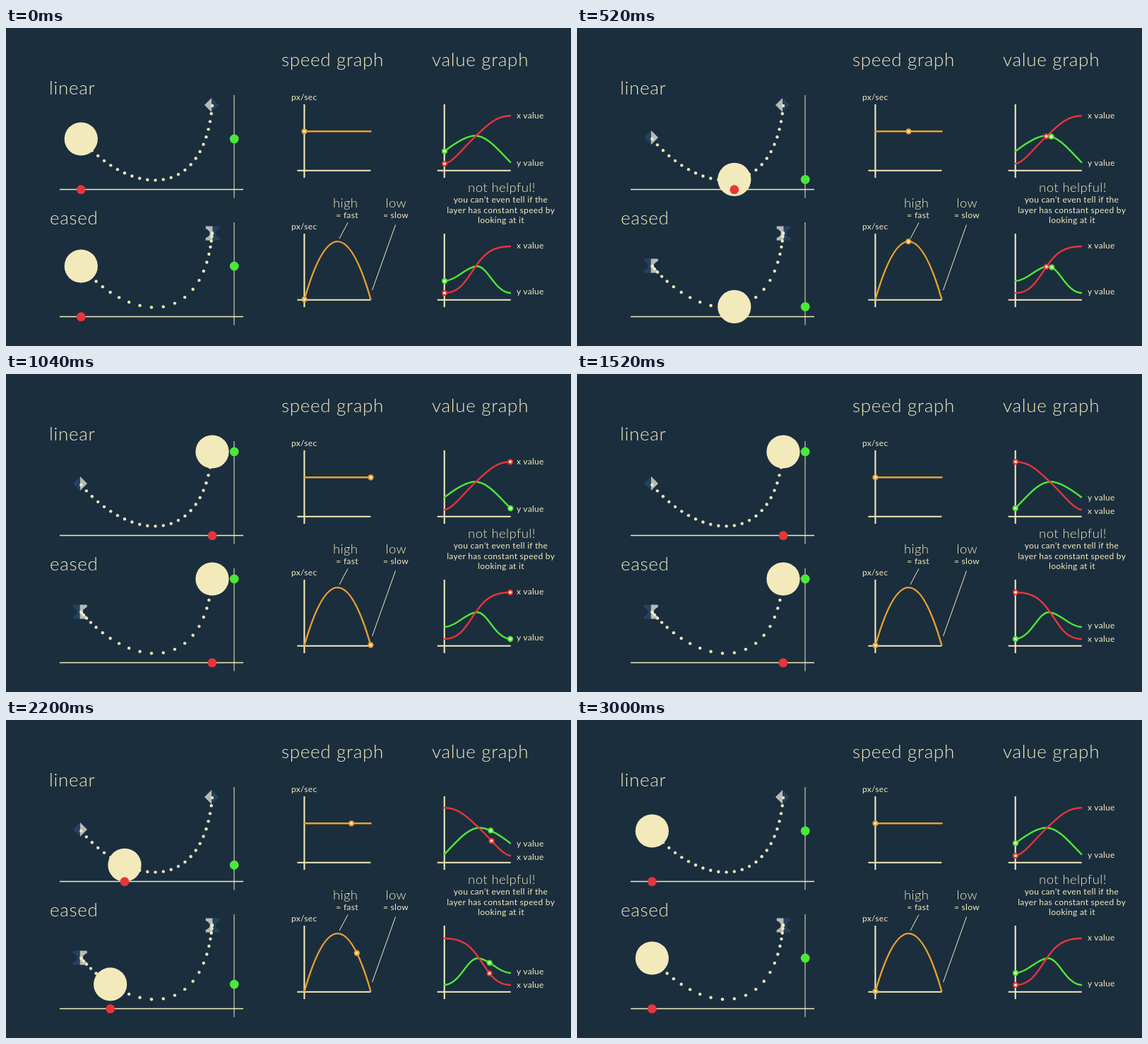
Recreate the animation shown at these times as an HTML page. Size 800 by 450 pixels, loop 3.04 s.

```html
<!DOCTYPE html>
<html lang="en">
<head>
<meta charset="utf-8">
<title>Speed graph and value graph</title>
<style>
  html, body { margin: 0; width: 100%; height: 100%; overflow: hidden; background: #1b2e3e; }
  svg { display: block; width: 100vw; height: 100vh; }
  text { font: 12px Lato, "Open Sans", sans-serif; fill: #f3eabb; letter-spacing: .3px; }
  .title { font-size: 26px; font-weight: 300; letter-spacing: .7px; }
  .sub { font-size: 18.5px; font-weight: 300; letter-spacing: .4px; }
  .mid { text-anchor: middle; }
  .curve { fill: none; stroke-width: 2.4; stroke-linecap: round; stroke-linejoin: round; }
  .axis { stroke: #f3eabb; stroke-width: 2.1; }
  .thin { stroke: #f3eabb; stroke-width: 1; }
  .floor { stroke: #f3eabb; stroke-width: 1.4; }
</style>
</head>
<body>
<svg id="stage" viewBox="0 0 800 450"></svg>
<script>
const NS = 'http://www.w3.org/2000/svg';
const RED = '#e8353a', GREEN = '#4ce838', ORANGE = '#e9a02e', CREAM = '#f3eabb';
const BRIGHT = '#b4bbb8', DARK = '#24425f';
const FRAME = 40, LOOP = 76, MOVE = 24, HALF = 36;
const stage = document.getElementById('stage');

function add(tag, attrs, parent = stage) {
  const el = document.createElementNS(NS, tag);
  for (const key in attrs) el.setAttribute(key, attrs[key]);
  parent.appendChild(el);
  return el;
}
const line = (x1, y1, x2, y2, cls) => add('line', { x1, y1, x2, y2, class: cls });
const dot = (cx, cy, r, fill) => add('circle', { cx, cy, r, fill });
function label(x, y, words, cls = '', parent = stage) {
  add('text', { x, y, class: cls }, parent).textContent = words;
}
function place(circle, p) {
  circle.setAttribute('cx', p.x);
  circle.setAttribute('cy', p.y);
}
function curve(d, color, parent = stage) {
  return add('path', { d, class: 'curve', stroke: color }, parent);
}
const along = (path, share) => path.getPointAtLength(path.getTotalLength() * share);
const smooth = p => p * p * (3 - 2 * p);

// Keyframe icon: two mirrored halves, the lit one facing the path
function icon(x, y, half, litSide) {
  for (const side of [-1, 1])
    add('path', { d: half, transform: `translate(${x} ${y}) scale(${side} 1)`,
      fill: side === litSide ? BRIGHT : DARK });
}

// Left column: a ball on a curved path with its x and y projections
function ballScene(top, half, starts, ends, ease, dotInFront) {
  const route = add('path', { fill: 'none',
    d: `M106.3 ${top + 157}C176 ${top + 238} 280 ${top + 245.5} 292 ${top + 110}` });
  line(76, top + 228.5, 336, top + 228.5, 'floor');
  line(323, top + 95, 323, top + 240.5, 'thin');
  icon(...starts, half, 1);
  icon(...ends, half, -1);
  for (let i = 0; i <= MOVE; i++) {
    const p = along(route, ease(i / MOVE));
    dot(p.x, p.y, 2.2, CREAM);
  }
  const makeRed = () => dot(0, 0, 6.4, RED);
  let red = dotInFront ? null : makeRed();
  const ball = dot(0, 0, 23.6, CREAM);
  red = red || makeRed();
  const green = dot(0, 0, 6.4, GREEN);
  return share => {
    const p = along(route, ease(share));
    place(ball, p);
    place(red, { x: p.x, y: top + 228.7 });
    place(green, { x: 323.2, y: p.y });
  };
}

function axes(x, top) {
  line(x, top + 108, x, top + 212, 'axis');
  line(x - 10, top + 201.7, x + 94, top + 201.7, 'axis');
}

function marker(color) {
  return add('circle', { r: 3.1, fill: CREAM, stroke: color, 'stroke-width': 2.1 });
}

function speedGraph(top, d) {
  label(404, top + 101.5, 'px/sec');
  axes(422.4, top);
  const path = curve(d, ORANGE), mark = marker(ORANGE);
  return share => place(mark, along(path, share));
}

// Right column: the way back is the mirror image of the way out
function valueGraph(top, redPath, greenPath, out, back) {
  axes(620.7, top);
  const mirrored = add('g', {});
  const green = curve(greenPath, GREEN, mirrored), red = curve(redPath, RED, mirrored);
  const redMark = marker(RED), greenMark = marker(GREEN);
  const names = [out, back].map(([xLine, yLine]) => {
    const g = add('g', {});
    label(723, xLine, 'x value', '', g);
    label(723, yLine, 'y value', '', g);
    return g;
  });
  return (share, returning) => {
    mirrored.setAttribute('transform', returning ? 'translate(1335 0) scale(-1 1)' : '');
    names[0].style.display = returning ? 'none' : '';
    names[1].style.display = returning ? '' : 'none';
    for (const [mark, path] of [[redMark, red], [greenMark, green]]) {
      const p = along(path, returning ? 1 - share : share);
      place(mark, { x: returning ? 1335 - p.x : p.x, y: p.y });
    }
  };
}

add('rect', { width: 800, height: 450, fill: '#1b2e3e' });
label(61, 94.3, 'linear', 'title');
label(62, 277.5, 'eased', 'title');
label(390, 53.8, 'speed graph', 'title');
label(603, 53.8, 'value graph', 'title');
label(480.7, 254.3, 'high', 'sub mid');
label(483, 269, '= fast', 'mid');
label(552.3, 254.3, 'low', 'sub mid');
label(552, 269, '= slow', 'mid');
label(702, 232.3, 'not helpful!', 'sub mid');
label(700.5, 247, 'you can’t even tell if the', 'mid');
label(700.7, 261.5, 'layer has constant speed by', 'mid');
label(701, 276, 'looking at it', 'mid');
line(484, 275.5, 472, 298, 'thin');
line(551.5, 278.5, 518.5, 371, 'thin');

const balls = [
  ballScene(0, 'M0 -10L10 0L0 10Z', [105, 155], [291, 109], p => p, true),
  ballScene(180, 'M0 -10H10V-6.5Q4 -4 4 0Q4 4 10 6.5V10H0Z', [104.7, 336.5], [292.7, 290.5], smooth, false)
];
const speeds = [
  speedGraph(0, 'M422.5 146.3H516.5'),
  speedGraph(183, 'M422.5 384Q469.5 220.5 516.3 383.5')
];
const values = [
  valueGraph(0,
    'M621 192C632 191 645 172 666 152C682 137 694 124.5 714 124.3',
    'M621 174.3C637 162 652 152.5 664 152.5C681 152.5 695 170 714.3 190',
    [128, 194.5], [198, 178.5]),
  valueGraph(183,
    'M621 375C645 375 653 353 666 336C677 320 688 309 714 309',
    'M621 358C638 357 652 337.5 667 337C683 338 692 373.5 714 375',
    [312, 377], [379, 360])
];

function draw(ms) {
  const tick = Math.floor(ms / FRAME) % LOOP;
  // 24 steps a second shown at 25: one step a second is held twice
  const step = (tick - Math.floor((tick + 13) / 25)) % (2 * HALF);
  const returning = step >= HALF;
  const share = Math.min(1, (step % HALF) / MOVE);
  balls.forEach(move => move(returning ? 1 - share : share));
  speeds.forEach(move => move(share));
  values.forEach(move => move(share, returning));
}

let begin;
function loop(now) {
  if (begin === undefined) begin = now;
  draw(now - begin);
  requestAnimationFrame(loop);
}
draw(0);
requestAnimationFrame(loop);
</script>
</body>
</html>
```
